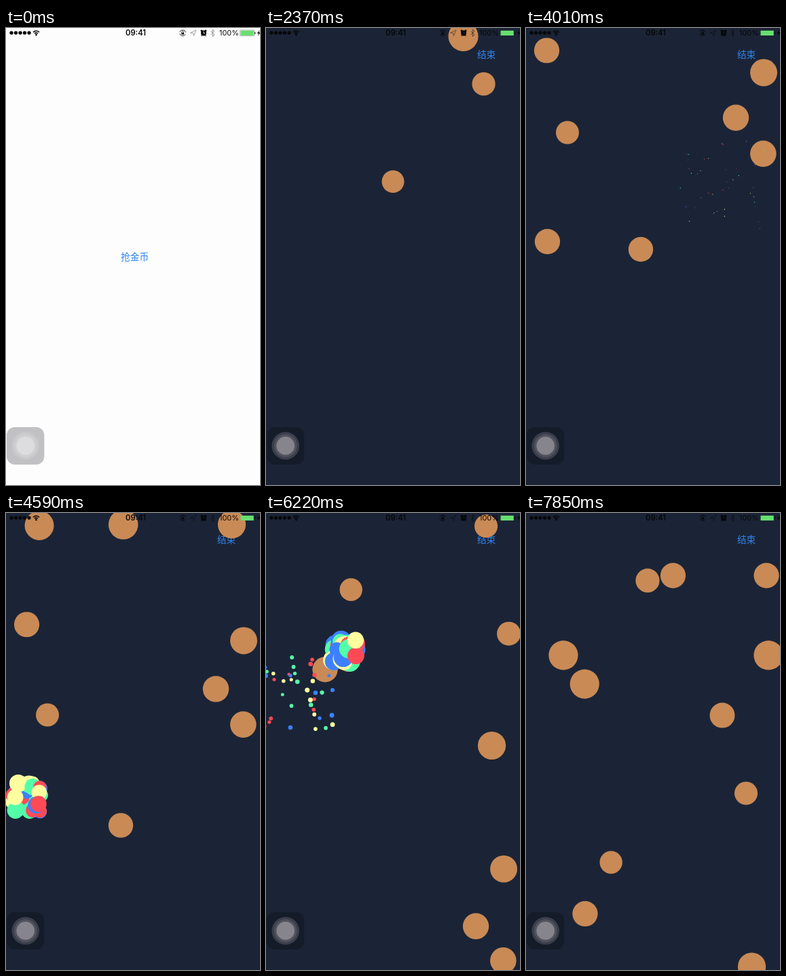
Write an HTML page with a canvas that moves like this. It is 374 px wide and 671 px high and loops after 7.99 s.

```html
<!DOCTYPE html>
<html lang="zh">
<head>
<meta charset="utf-8">
<title>抢金币</title>
<style>
html, body { margin: 0; width: 100%; height: 100%; overflow: hidden; background: #fdfdfd; }
canvas { display: block; width: 374px; height: 671px; }
</style>
</head>
<body>
<canvas id="stage"></canvas>
<script>
const W = 374, H = 671, LOOP = 7990;
const STEP = 148.04, GAME_START = 1028; // the game advances in steps of STEP ms
const BURST_STEPS = 3.4, SPARKS = 40, REACH = 66;
const NAVY = '#1b2436', COIN = '#c98a56', LINK = '#2f83ee', INK = '#050608';
const HUES = ['#3d80ff', '#52ffa8', '#ff4a56', '#ffffa0'];
const CJK = '"Noto Sans CJK SC", "Noto Sans CJK", sans-serif';

const canvas = document.getElementById('stage');
const dpr = window.devicePixelRatio || 1;
canvas.width = W * dpr;
canvas.height = H * dpr;
const ctx = canvas.getContext('2d');
ctx.scale(dpr, dpr);

const clamp = v => Math.max(0, Math.min(1, v));
const spread = p => 1 - (1 - p) ** 1.5;
const shrink = p => Math.max(0.6, 19.5 * (1 - p) ** 1.6);

function seeded(seed) {
  let s = seed * 7919 + 17;
  return () => (s = (s * 16807) % 2147483647) / 2147483647;
}

function disc(x, y, r, fill) {
  ctx.fillStyle = fill;
  ctx.beginPath();
  ctx.arc(x, y, r, 0, Math.PI * 2);
  ctx.fill();
}

function label(text, x, y, size, fill, family = CJK, weight = 400) {
  ctx.font = `${weight} ${size}px ${family}`;
  ctx.fillStyle = fill;
  ctx.textAlign = 'center';
  ctx.textBaseline = 'middle';
  ctx.fillText(text, x, y);
}

function stroke(path, color, width = 1) {
  ctx.strokeStyle = color;
  ctx.lineWidth = width;
  ctx.stroke(new Path2D(path));
}

// x, radius, step at which the centre crosses the top edge, step of the tap
const coins = [
  [187, 16.5, 2.88, 11.75],
  [320.5, 17.1, 6.69, 14.9],
  [290.5, 22, 8.56, 16.9],
  [169, 18.2, 10.27],
  [31.5, 18.65, 10.38, 23.2],
  [349.3, 19.3, 14.14],
  [309, 19.2, 15.84],
  [61, 17, 15.71, 25.7],
  [350, 19.95, 17.85],
  [30.5, 18.6, 18.99, 27.85],
  [332.5, 20.6, 23.43],
  [49, 21.5, 23.35, 32.7],
  [172.7, 21.8, 23.39, 30.2],
  [87, 18.65, 27.95],
  [116, 19, 28.06, 34.4],
  [357.5, 17.5, 29.9, 37.5],
  [125.2, 16.7, 31.91],
  [324, 17.05, 34.46],
  [289, 18.5, 36.96],
  [86.3, 21.6, 37.08],
  [357, 21.6, 38.58],
  [55, 21.6, 38.58],
  [179, 17.6, 43.13],
  [354, 18.6, 43.19],
  [216.5, 18.6, 43.19]
].map(([x, r, enter, tap = Infinity]) => ({ x, r, enter, tap }));

// Bigger coins fall more slowly
const fallY = (coin, k) => (k - coin.enter) * 608 / coin.r;

function drawBurst(coin, seed, p) {
  const rnd = seeded(seed), y = fallY(coin, coin.tap);
  const offset = () => (rnd() * 2 - 1) * REACH * spread(p);
  for (let i = 0; i < SPARKS; i++) {
    const size = 0.75 + rnd() * 0.35;
    disc(coin.x + offset(), y + offset(), shrink(p) * size, HUES[i % HUES.length]);
  }
}

function drawGame(k) {
  for (const coin of coins) {
    const y = fallY(coin, k);
    if (k < coin.tap && y > -coin.r && y < H) disc(coin.x, y, coin.r, COIN);
  }
  coins.forEach((coin, i) => {
    const p = (k - coin.tap) / BURST_STEPS;
    if (p >= 0 && p < 1) drawBurst(coin, i + 1, p);
  });
}

function drawStatus(dark) {
  const soft = dark ? 'rgba(0,0,0,.55)' : '#8c8c8c';
  for (let i = 0; i < 5; i++) disc(8 + i * 6.5, 7.1, 2.7, INK);

  // wifi
  for (const r of [3.4, 6.2]) {
    ctx.strokeStyle = INK;
    ctx.lineWidth = 1.6;
    ctx.beginPath();
    ctx.arc(44.5, 10.5, r, -Math.PI * 0.76, -Math.PI * 0.24);
    ctx.stroke();
  }
  disc(44.5, 9.9, 1.4, INK);

  label('09:41', 191, 7.5, 11.2, INK, 'Inter, sans-serif', 600);

  // rotation lock
  stroke('M255.8 6A4.6 4.6 0 0 1 264.6 6.5M264.4 9A4.6 4.6 0 0 1 255.8 8.2', INK, 0.8);
  stroke('M258.9 7V5.8a1.3 1.3 0 0 1 2.6 0V7', INK, 0.7);
  ctx.fillStyle = INK;
  ctx.fillRect(258.3, 6.8, 3.8, 2.8);

  // location
  stroke('M271.5 7.2L280 3L276.4 11.6L275.8 7.6Z', soft, 0.8);

  // alarm clock
  disc(291, 7.4, 4, INK);
  disc(288, 4, 1.5, INK);
  disc(294, 4, 1.5, INK);
  stroke('M288.6 10.6L287.6 11.8M293.4 10.6L294.4 11.8', INK, 1.1);
  stroke('M291 5V7.6H293', dark ? NAVY : '#fff', 0.8);

  // bluetooth
  stroke('M301.6 4.6L307 10L304.3 12.6V2L307 4.6L301.6 10', soft, 0.9);

  // battery
  label('100%', 328.5, 7.5, 10.9, INK, 'Inter, sans-serif');
  if (!dark) {
    ctx.strokeStyle = '#9a9a9a';
    ctx.lineWidth = 0.7;
    ctx.strokeRect(344.7, 3, 20.8, 8.8);
  }
  ctx.fillStyle = '#66e06f';
  ctx.fillRect(345.5, 3.8, 19.2, 7.2);
  ctx.fillStyle = INK;
  ctx.fillRect(366.2, 5.8, 1, 3.2);
  ctx.fill(new Path2D('M373.4 2.8L369.8 8H372L370.8 12L374.4 6.6H372.2Z'));
}

function drawTouchButton(dark) {
  ctx.fillStyle = dark ? '#151c29' : '#c1c0c3';
  ctx.beginPath();
  ctx.roundRect(1, 586, 55.3, 55, 12);
  ctx.fill();
  const rings = dark ? ['#3b3f4b', '#50525d', '#86858d'] : ['#c9c8cb', '#d0cfd2', '#dddcde'];
  rings.forEach((fill, i) => disc(28.7, 613.4, 20.3 - i * 3.5, fill));
}

function draw(now) {
  const t = now % LOOP;
  const k = Math.floor((t - GAME_START) / STEP);
  const dark = k >= 0;

  ctx.fillStyle = '#fdfdfd';
  ctx.fillRect(0, 0, W, H);
  label('抢金币', 189.7, 335.6, 13.8, LINK);

  if (dark) {
    // the game sheet slides up from the bottom
    ctx.save();
    ctx.translate(0, H * (1 - clamp((k + 1.4) / 3.2)) ** 3);
    ctx.fillStyle = NAVY;
    ctx.fillRect(0, 0, W, H);
    label('结束', 324.6, 39, 13.7, LINK);
    drawGame(k);
    ctx.restore();
  }
  drawStatus(dark);
  drawTouchButton(dark);
}

const start = performance.now();
function tick() {
  draw(performance.now() - start);
  requestAnimationFrame(tick);
}
tick();
</script>
</body>
</html>
```
